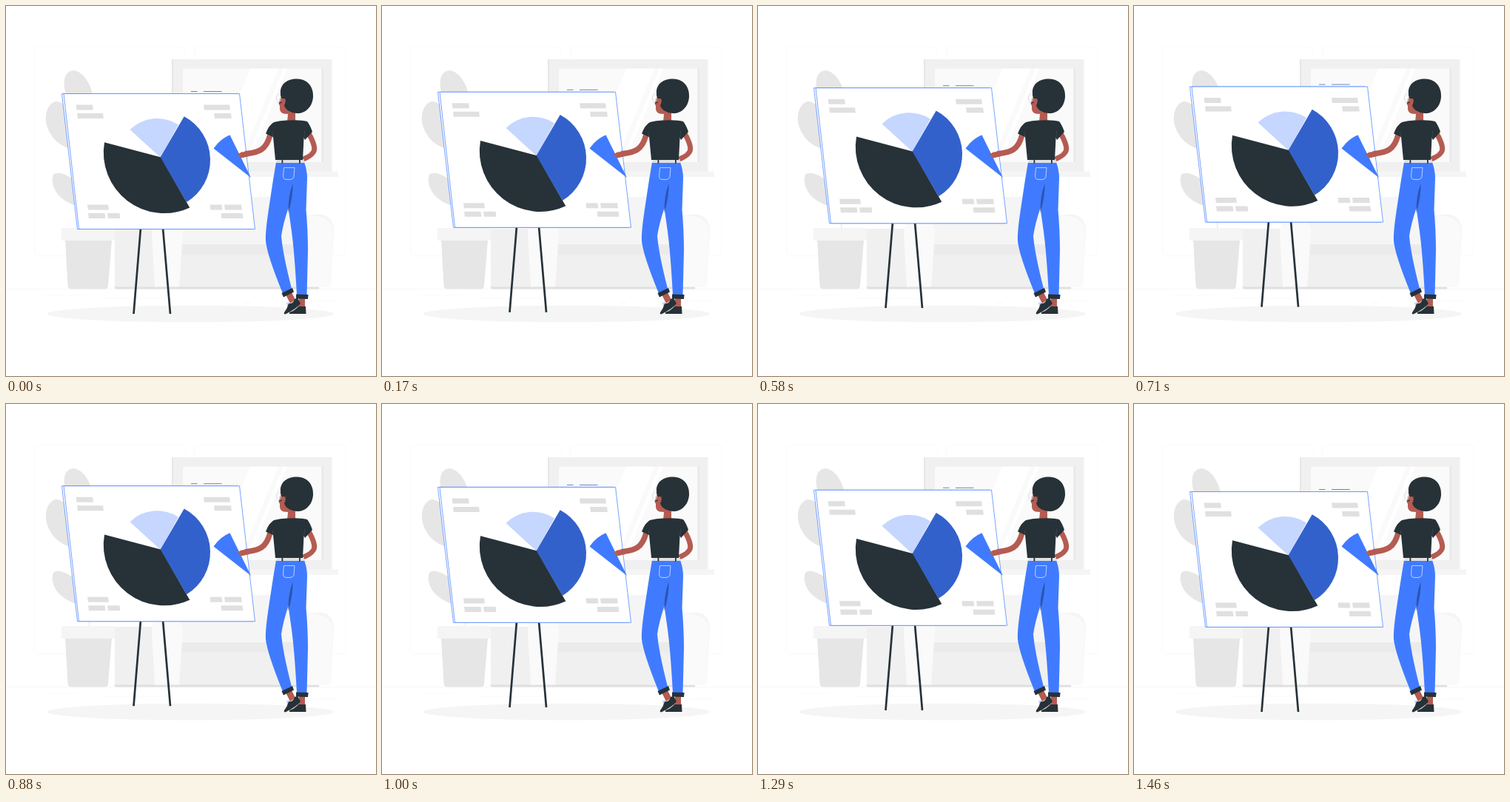
Write an HTML page that moves like this. It is 500x500 px and loops after 1500 ms.

```html
<!DOCTYPE html>
<html lang="en">
<head>
<meta charset="utf-8">
<title>Presentation board</title>
<style>
  html, body { margin: 0; width: 100%; height: 100%; overflow: hidden; background: #fff; }
  svg { display: block; width: 100%; height: 100%; }
  .ink { fill: #263238; }
  .skin { fill: #b55b52; }
  .blue { fill: #407bff; }
  .limb { fill: none; stroke: #b55b52; stroke-linecap: round; stroke-linejoin: round; }
</style>
</head>
<body>
<svg viewBox="0 0 500 500">
  <g fill="none" stroke="#ebebeb" stroke-width=".3">
    <rect x="38.2" y="55" width="204.5" height="282.8" rx="5.7"/>
    <rect x="254.5" y="55" width="204.5" height="282.8" rx="5.7"/>
    <path d="M0 382.4H500M416.8 398.5h33.1M322.5 401.2h8.7M396.6 389.2h19.2M52.5 391h43.2M104.6 391h6.3M131.5 395.1h93.7"/>
  </g>

  <g id="window">
    <path fill="#e6e6e6" d="M224 72h10v152h-10z"/>
    <path fill="#f0f0f0" d="M226 72H440.5V224H226z"/>
    <path fill="#f5f5f5" d="M230 223.5H449V231H230z"/>
    <path fill="#fafafa" d="M239 84.5H427V211H239z"/>
    <path fill="#fff" d="M330 84.5h38L316 211h-38zM375 84.5h5L328 211h-5z"/>
    <path fill="#e6e6e6" d="M426.5 84.5h2V211h-2z"/>
  </g>

  <g id="sofa">
    <path fill="#e0e0e0" d="M146 379H423V382.5H148z"/>
    <path fill="#f0f0f0" d="M147 301h60v78.5h-60z"/>
    <path fill="#f5f5f5" d="M205 258H392Q400 258 400 268V323H205z"/>
    <path fill="#ebebeb" d="M234 322H410V336H234z"/>
    <path fill="#f0f0f0" d="M234 335.5H410V379.5H234z"/>
    <path fill="#fafafa" d="M197 310Q197 282 218 282Q239 284 239 308L234 379.5H201z"/>
    <path fill="#f5f5f5" d="M404 284Q414 281 425 281.5Q443 284 443 304L439 375Q439 379.5 434 379.5H404z"/>
    <path fill="#fafafa" d="M404 300Q404 283 415 283Q442 286 442 307L438.500 379.500H404z"/>
  </g>

  <g id="plant" fill="#e6e6e6">
    <path d="M86 132C74 108 77 88 91 87C106 88 119 112 118 132z"/>
    <path d="M67 129C55 132 51 150 56 164C62 181 75 190 90 194L94 155C87 143 78 128 67 129z"/>
    <path d="M64 228C59 241 68 263 98 271V241C87 229 70 222 64 228z"/>
    <path fill="none" stroke="#e6e6e6" d="M112.500 270V301"/>
    <path d="M80 316H143L138 378Q137.500 382.500 133 382.500H88Q84 382.500 83.500 378z"/>
    <rect x="75" y="300" width="72" height="17" rx="2" fill="#f5f5f5"/>
  </g>

  <ellipse cx="249.500" cy="416" rx="193.900" ry="11.300" fill="#f5f5f5"/>

  <g id="board">
    <path fill="none" stroke="#263238" stroke-width="2.700" d="M182 300L172.500 416M212 300L222 416"/>
    <path stroke="#6685c0" d="M250 115.500h8.500M267 115.500h24.500"/>
    <g fill="#fff" stroke="#407bff" stroke-width=".7">
      <path d="M75.500 118.500H313L334 301.500H96.500z"/>
      <path d="M78 118.500H315.500L336.500 301.500H98.500z"/>
    </g>
    <g id="labels" fill="#e0e0e0"></g>
    <path fill="#c5d6ff" d="M208.500 204.500L167.500 167A52.400 52.400 0 0 1 233 160.500z"/>
    <path fill="#3361cc" d="M208.500 204.500L240.700 149.300A66.600 66.600 0 0 1 244 265z"/>
    <path class="ink" d="M208.800 204.300L133 184.300A82 82 0 0 0 248.300 272.500z"/>
  </g>

  <g id="woman">
    <path class="blue" d="M331 232L280.500 192.500Q289.500 179.500 302.500 174.300z"/>
    <path class="limb" stroke-width="7.500" d="M357 174Q353 189 345 194Q338 198.500 325 199.500"/>
    <path class="skin" d="M328 196.500L318 197.500L312 201L316.500 202L315 205.500L320 205L329 203z"/>
    <path class="limb" stroke-width="7" d="M409 172Q418 188 416.500 195Q415 201 404 206"/>

    <path class="skin" d="M373 118Q370 126 368.500 132L370 135Q369 144 375 145.500L381 146L380 157H391V140L388 118z"/>
    <path class="ink" d="M371 118C370 105 381 98 394 98.500C408 99 416 110 415 123C414 137 404 145.500 393 145C383 144.500 377 139 376 134Q379 129 377 125Q374 126 371 124z"/>
    <ellipse cx="368.500" cy="124.500" rx="3" ry="5.500" fill="none" stroke="#d5d5d5" stroke-width=".8"/>
    <path class="ink" d="M368.800 130.500l4-1v1.200l-3.500 1z"/>

    <path class="blue" d="M365 211H403Q407 222 407 233L405.500 275Q408 305 408 330L406.500 391H393Q390 335 386 305L381.500 273Q374 296 372 311Q374 335 386 382L374 388.500Q353 337 351 318Q350 306 356 268Q361 234 365 211z"/>
    <path fill="#2c56b3" d="M387.500 240Q381 256 381.500 279Q388 259 387.500 240z"/>
    <path fill="none" stroke="#c5d6ff" stroke-width=".9" d="M375.500 218.500H390L389 231Q388 234.500 384 234.500H378Q374.500 234 374.500 230z"/>
    <path fill="#e0e0e0" d="M366 207H402.500L403 212H365z"/>
    <path class="ink" d="M372.500 206h1.800v6.500h-1.800zM396 206h1.800v6.500h-1.800z"/>
    <path class="ink" d="M362 157Q372 154 382 154.500Q398 153.500 407 156Q411 161 414 170L404 181L402.500 178L401 208H364L361 177L351 172.500Q355 161 362 157z"/>
    <path fill="none" stroke="#465157" stroke-width=".6" d="M402.500 179L404 168M361 177L360 170"/>

    <path class="skin" d="M378 390L386 387L391 397L384 402zM396 394H404L404 409H395z"/>
    <path class="ink" d="M372.500 388L387 381L389 386.500L375 393.500zM392 389.500L408.500 390L408 396L392 395.500z"/>
    <path class="ink" d="M383 414Q391 411 395 406H405L405.500 416H383z"/>
    <path fill="#c5d6ff" d="M379 401l4-1 1 4-4 2z"/>
    <path class="ink" d="M376 414Q380 409 382 402Q388 403 390 396L394 394.500L398 402Q393 409 377.500 416.500Q375 416.500 376 414z"/>
  </g>
</svg>
<script>
  const board = document.getElementById("board");
  const labels = [
    [94.5, 133.5, 22.5], [96, 145, 35], [267, 133.5, 35], [281, 145, 23],
    [110, 268.5, 28], [111, 280, 22.5], [137, 280, 16.5],
    [275.5, 268.5, 16], [295, 268.5, 23], [290.5, 280, 29]
  ];
  document.getElementById("labels").innerHTML = labels
    .map(([x, y, w]) => `<path d="M${x} ${y}h${w}l.9 7h${-w}z"/>`).join("");

  const LOOP = 1500, STEPS = 36, LIFT = 10;

  // The easel rises and falls linearly, stepped at 24 positions per second.
  function draw(now) {
    const step = Math.floor(((now + 5) % LOOP) / LOOP * STEPS);
    const phase = (step + 0.5) / STEPS;
    const rise = LIFT * (1 - Math.abs(1 - 2 * phase));
    board.setAttribute("transform", `translate(0 ${(0.28 - rise).toFixed(2)})`);
    requestAnimationFrame(draw);
  }
  draw(performance.now());
</script>
</body>
</html>
```
